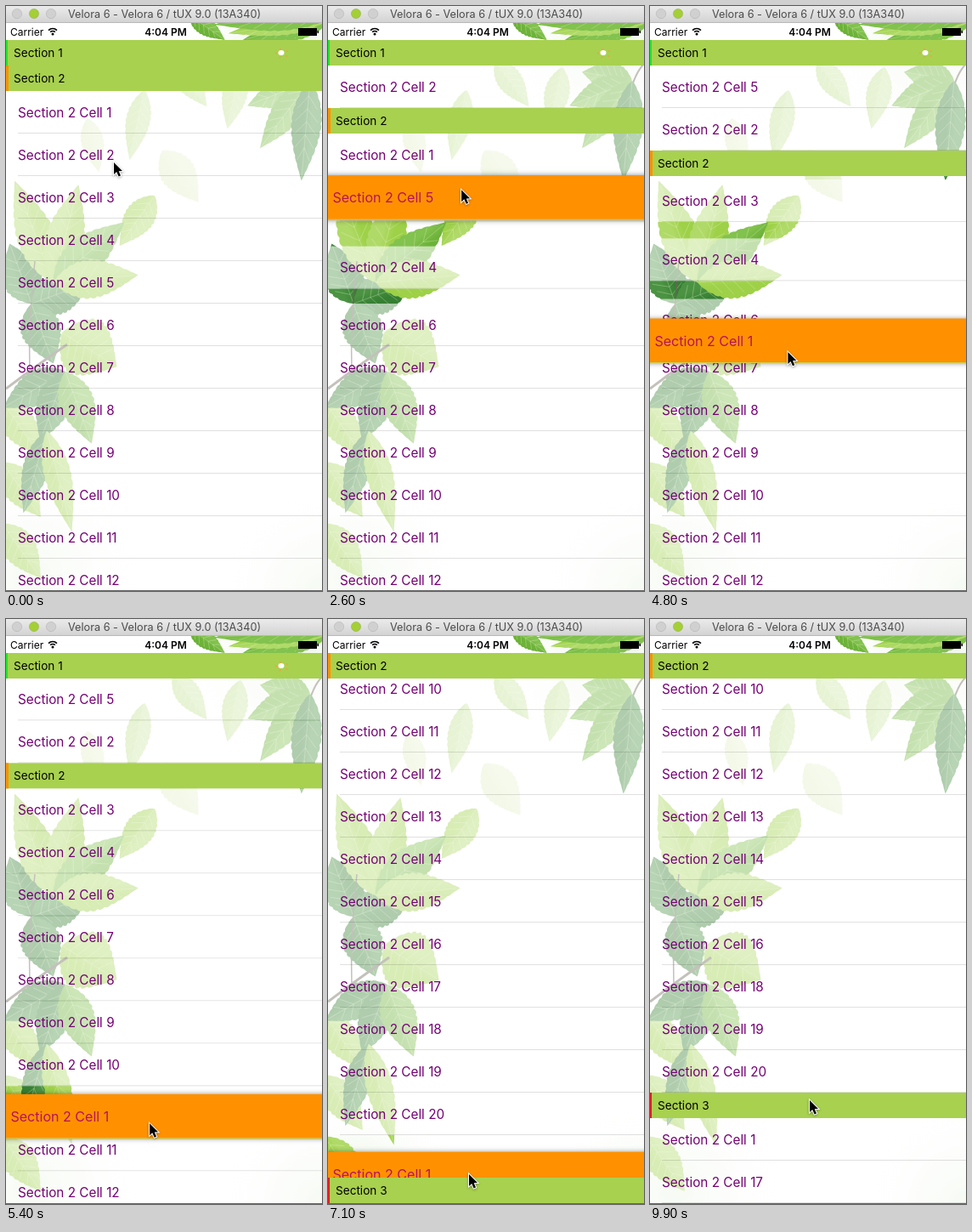
An HTML page with a canvas that plays this animation: 372x688 px, repeating every 10000 ms.

```html
<!DOCTYPE html>
<html lang="en">
<head>
<meta charset="utf-8">
<title>Sortable list</title>
<style>
html, body { margin: 0; width: 372px; height: 688px; overflow: hidden; background: #fff; }
canvas { display: block; }
</style>
</head>
<body>
<canvas id="stage" width="372" height="688"></canvas>
<script>
const W = 372, H = 688, TOP = 40, LOOP = 10000, STEP = 100;
const ROW = 50, HEAD = 30, LAG = 22, SCROLL = 443;
const FONT = 'Inter, Roboto, sans-serif';
const ctx = document.getElementById('stage').getContext('2d');

const clamp = (v, a = 0, b = 1) => Math.min(b, Math.max(a, v));
const mix = (a, b, k) => a + (b - a) * k;
const ease = p => { p = clamp(p); return p < .5 ? 2 * p * p : 1 - 2 * (1 - p) * (1 - p); };

// Pointer stops: it rests at (x, y) between two times and glides on
const stops = [
  { at: [0, 350], x: 127, y: 184 },
  { at: [850, 1200], x: 140, y: 90 },
  { at: [1650, 2350], x: 163, y: 320 },
  { at: [2900, 3200], x: 150, y: 92 },
  { at: [3850, 4500], x: 152, y: 228 },
  { at: [5050, 5300], x: 171, y: 556 },
  { at: [5560, 7100], x: 166, y: 653 },
  { at: [7350, 7850], x: 168, y: 676 },
  { at: [8600, 8920], x: 172, y: 432 },
  { at: [9100, 9100], x: 178, y: 593 },
  { at: [9300, 9600], x: 185, y: 672 },
  { at: [9880, LOOP], x: 188, y: 566 }
];

function pointer(t) {
  const i = stops.findIndex(s => t <= s.at[1]);
  const b = stops[i], a = stops[Math.max(0, i - 1)];
  const k = i ? clamp((t - a.at[1]) / (b.at[0] - a.at[1])) : 1;
  return { x: mix(a.x, b.x, k), y: mix(a.y, b.y, k) };
}

const scrollAt = t => SCROLL * Math.pow(clamp((t - 5360) / 1500), 1.8);

// Table items in their first order
const heads = ['#1fe626', '#ff9100', '#e01e1e'].map((bar, i) =>
  ({ text: 'Section ' + (i + 1), bar, barW: i === 1 ? 3 : 2, h: HEAD, moves: [] }));
const rows = Array.from({ length: 20 }, (_, i) =>
  ({ text: 'Section 2 Cell ' + (i + 1), h: ROW, moves: [] }));
const items = [heads[0], heads[1], ...rows, heads[2]];

const drags = [
  { row: rows[1], from: 100, to: 1050 },
  { row: rows[4], from: 2100, to: 3150 },
  { row: rows[0], from: 4300, to: 7650 },
  { row: rows[16], from: 8800, to: 9500 }
];

// Work out once when each item makes room for a dragged row
(function plan() {
  let y = 0;
  for (const it of items) { it.base = it.y = y; y += it.h; }
  const order = items.slice();
  function swap(t, i, dir) {
    const a = order[i], b = order[i + dir];
    a.moves.push([t, dir * b.h]); a.y += dir * b.h;
    b.moves.push([t, -dir * a.h]); b.y -= dir * a.h;
    order[i] = b; order[i + dir] = a;
    return i + dir;
  }
  for (const d of drags) {
    for (let t = d.from; t <= d.to; t += 5) {
      const py = pointer(t - LAG).y - TOP + scrollAt(t);
      let i = order.indexOf(d.row);
      while (i < order.length - 1 && py > d.row.y + ROW) i = swap(t, i, 1);
      while (i > 1 && py < d.row.y) i = swap(t, i, -1);
    }
  }
})();

const place = (it, t) => it.moves.reduce((y, [at, d]) => y + d * ease((t - at) / 300), it.base);
const lift = (d, t) => ease((t - d.from) / 250) * (1 - ease((t - d.to) / 250));

// Backdrop: fans of leaves around a few hubs
const tones = {
  dark: ['#367f33', '#4b9343'],
  mid: ['#6cb238', '#82c24e'],
  light: ['#9ed148', '#b0da68'],
  soft: ['#c3e294', '#cfe8a8'],
  pale: ['#e2efc6', '#e9f3d4']
};

function leaf(g, x, y, deg, len, w, tone) {
  const n = 36, half = u => w / 2 * Math.sin(Math.PI * Math.pow(u, .8));
  const [deep, soft] = tones[tone];
  g.save();
  g.translate(x, y);
  g.rotate(deg * Math.PI / 180);
  const fill = g.createLinearGradient(0, -w / 2, 0, w / 2);
  fill.addColorStop(.35, soft);
  fill.addColorStop(.65, deep);
  g.fillStyle = fill;
  g.beginPath();
  for (const side of [-1, 1]) {
    for (let i = 0; i <= n; i++) {
      const u = (side < 0 ? i : n - i) / n;
      g.lineTo(u * len, side * half(u) * (i % 3 ? 1 : .93));
    }
  }
  g.fill();
  g.strokeStyle = 'rgba(235,245,205,.35)';
  g.lineWidth = .8;
  g.beginPath();
  g.moveTo(0, 0);
  g.lineTo(len * .96, 0);
  for (let u = .15; u < .8; u += .13) {
    for (const side of [-1, 1]) {
      g.moveTo(u * len, 0);
      g.lineTo((u + .13) * len, side * .75 * half(u + .1));
    }
  }
  g.stroke();
  g.restore();
}

function fan(g, x, y, [a0, a1], [l0, l1], w, names) {
  names.forEach((tone, i) => {
    const k = i / (names.length - 1);
    leaf(g, x, y, mix(a0, a1, k), mix(l0, l1, k), w, tone);
  });
}

function stem(g, w, x0, y0, cx, cy, x1, y1) {
  g.strokeStyle = '#6b6556';
  g.lineWidth = w;
  g.beginPath();
  g.moveTo(x0, y0);
  g.quadraticCurveTo(cx, cy, x1, y1);
  g.stroke();
}

function glow(g, x, y, r) {
  const f = g.createRadialGradient(x, y, 0, x, y, r);
  f.addColorStop(0, 'rgba(210,234,195,.5)');
  f.addColorStop(1, 'rgba(255,255,255,0)');
  g.fillStyle = f;
  g.fillRect(0, 0, W, H);
}

const backdrop = document.createElement('canvas');
backdrop.width = W;
backdrop.height = H;
(function paint(g) {
  g.fillStyle = '#fff';
  g.fillRect(0, 0, W, H);
  glow(g, 372, 688, 120);
  glow(g, 30, 670, 130);
  glow(g, 330, 40, 130);

  // Drifting leaves
  leaf(g, 197, 64, 54, 67, 30, 'soft');
  leaf(g, 276, 72, 102, 74, 30, 'soft');
  leaf(g, 163, 99, 102, 84, 29, 'soft');
  leaf(g, 96, 132, 78, 65, 27, 'pale');
  leaf(g, 184, 170, 55, 74, 42, 'pale');
  leaf(g, 175, 223, 125, 72, 36, 'light');

  // Upper right twig
  leaf(g, 215, 10, 35, 52, 22, 'mid');
  fan(g, 385, 12, [160, 176], [95, 140], 26, ['mid', 'mid', 'light', 'mid']);
  stem(g, 2, 372, 68, 358, 82, 352, 120);
  fan(g, 358, 88, [190, 95], [60, 118], 36, ['mid', 'mid', 'mid', 'dark']);

  // Left branch
  for (let i = 0; i < 3; i++) leaf(g, -4, 465 + 72 * i, 55, 78, 40, 'light');
  fan(g, 30, 350, [-110, 70], [75, 75], 48, ['dark', 'dark', 'dark']);
  fan(g, 70, 430, [150, 70], [85, 90], 42, ['dark', 'dark', 'mid']);
  fan(g, 48, 500, [106, 76], [100, 122], 32, ['dark', 'light']);
  fan(g, 56, 325, [-111, -5], [128, 100], 46, ['light', 'light', 'mid', 'light']);
  leaf(g, 66, 384, 32, 76, 72, 'light');
  stem(g, 3, 0, 450, 40, 420, 72, 398);
  stem(g, 1.5, 28, 434, 26, 370, 34, 300);
})(backdrop.getContext('2d'));

function label(text, x, y, size, color, weight = 400, align = 'left') {
  ctx.font = `${weight} ${size}px ${FONT}`;
  ctx.textAlign = align;
  ctx.fillStyle = color;
  ctx.fillText(text, x, y + size * .36);
}

function box(x, y, w, h, color) {
  ctx.fillStyle = color;
  ctx.fillRect(x, y, w, h);
}

function drawRow(it, y, alpha) {
  if (alpha <= 0 || y > H || y < TOP - ROW) return;
  ctx.globalAlpha = alpha;
  box(0, y, W, ROW, 'rgba(255,255,255,.6)');
  box(14, y + ROW - 1, W - 14, 1, 'rgba(0,0,0,.12)');
  label(it.text, 14, y + 25, 15.3, '#740074');
  ctx.globalAlpha = 1;
}

function drawLifted(it, cy, k) {
  const scale = 1 + .05 * k;
  ctx.save();
  ctx.globalAlpha = k;
  ctx.translate(W / 2, cy);
  ctx.scale(scale, scale);
  ctx.translate(-W / 2, -ROW / 2);
  ctx.shadowColor = 'rgba(0,0,0,.45)';
  ctx.shadowBlur = 6;
  box(0, 0, W, ROW, '#ff9100');
  ctx.shadowColor = 'transparent';
  box(0, ROW - 1, W, 1, '#c9cf58');
  label(it.text, 14, 25, 15.3, '#b5135a');
  ctx.restore();
}

function drawSpark(x, y) {
  for (let i = 0; i < 5; i++) {
    const a = i * 1.26 - .6;
    box(x + 7 * Math.cos(a), y + 5 * Math.sin(a), 2, 1.5, '#f0a040');
  }
  ctx.fillStyle = '#fff';
  ctx.beginPath();
  ctx.ellipse(x, y, 3.5, 3, 0, 0, 7);
  ctx.fill();
}

function drawHead(it, y) {
  if (y > H || y < TOP - HEAD) return;
  box(0, y, W, HEAD, '#a8d14f');
  box(0, y, it.barW, HEAD, it.bar);
  label(it.text, 9, y + 15, 13.6, '#000');
  if (it === heads[0]) drawSpark(324, y + 15);
}

function drawTable(t) {
  const s = scrollAt(t);
  const screenY = it => TOP + place(it, t) - s;
  ctx.save();
  ctx.beginPath();
  ctx.rect(0, TOP, W, H - TOP);
  ctx.clip();
  const held = drags.find(d => t >= d.from && t < d.to + 250);
  const k = held ? lift(held, t) : 0;
  for (const r of rows) drawRow(r, screenY(r), held && held.row === r ? 1 - k : 1);
  if (held) {
    const py = pointer(Math.min(t, held.to) - LAG).y;
    drawLifted(held.row, mix(screenY(held.row) + ROW / 2, py, k), k);
  }
  // Headers stick to the top until the next one pushes them away
  const ys = heads.map(screenY);
  heads.forEach((h, i) => {
    const next = i < 2 ? ys[i + 1] - HEAD : Infinity;
    drawHead(h, Math.min(Math.max(ys[i], TOP), next));
  });
  ctx.restore();
  box(0, H - 1, W, 1, '#666');
}

function drawBars() {
  const bar = ctx.createLinearGradient(0, 0, 0, 20);
  bar.addColorStop(0, '#ebebeb');
  bar.addColorStop(1, '#d2d2d2');
  box(0, 0, W, 20, bar);
  box(0, 19, W, 1, '#b9b9b9');
  ['#d0d0d0', '#a4cf35', '#d0d0d0'].forEach((c, i) => {
    ctx.beginPath();
    ctx.arc(13 + 20 * i, 9, 5.7, 0, 7);
    ctx.fillStyle = c;
    ctx.fill();
    ctx.strokeStyle = 'rgba(0,0,0,.12)';
    ctx.lineWidth = .8;
    ctx.stroke();
  });
  label('Velora 6 - Velora 6 / tUX 9.0 (13A340)', 186.5, 9.5, 12.7, '#4b4b4b', 400, 'center');

  label('Carrier', 5, 30.5, 12, '#000');
  label('4:04 PM', 188, 30.5, 12, '#000', 600, 'center');
  ctx.strokeStyle = '#000';
  ctx.lineWidth = 1.7;
  for (const r of [4, 7]) {
    ctx.beginPath();
    ctx.arc(55, 33.5, r, -Math.PI * .75, -Math.PI * .25);
    ctx.stroke();
  }
  ctx.fillStyle = '#000';
  ctx.beginPath();
  ctx.arc(55, 33, 1.5, 0, 7);
  ctx.fill();
  box(344, 26, 22, 9, '#000');
  box(366.5, 29, 1.5, 3, '#000');
}

function drawPointer({ x, y }) {
  const arrow = new Path2D('M0 0V14L3.2 11L5.6 16.4L8 15.4L5.7 10.2L10 10Z');
  ctx.save();
  ctx.translate(x, y);
  ctx.shadowColor = 'rgba(0,0,0,.35)';
  ctx.shadowBlur = 3;
  ctx.shadowOffsetY = 1;
  ctx.strokeStyle = '#fff';
  ctx.lineWidth = 2;
  ctx.stroke(arrow);
  ctx.shadowColor = 'transparent';
  ctx.fillStyle = '#000';
  ctx.fill(arrow);
  ctx.restore();
}

function draw(t) {
  ctx.drawImage(backdrop, 0, 0);
  drawTable(t);
  drawBars();
  drawPointer(pointer(t));
}

const start = performance.now();
function tick(now) {
  const t = Math.max(0, now - start) % LOOP;
  draw(Math.floor(t / STEP) * STEP);
  requestAnimationFrame(tick);
}
draw(0);
requestAnimationFrame(tick);
</script>
</body>
</html>
```
